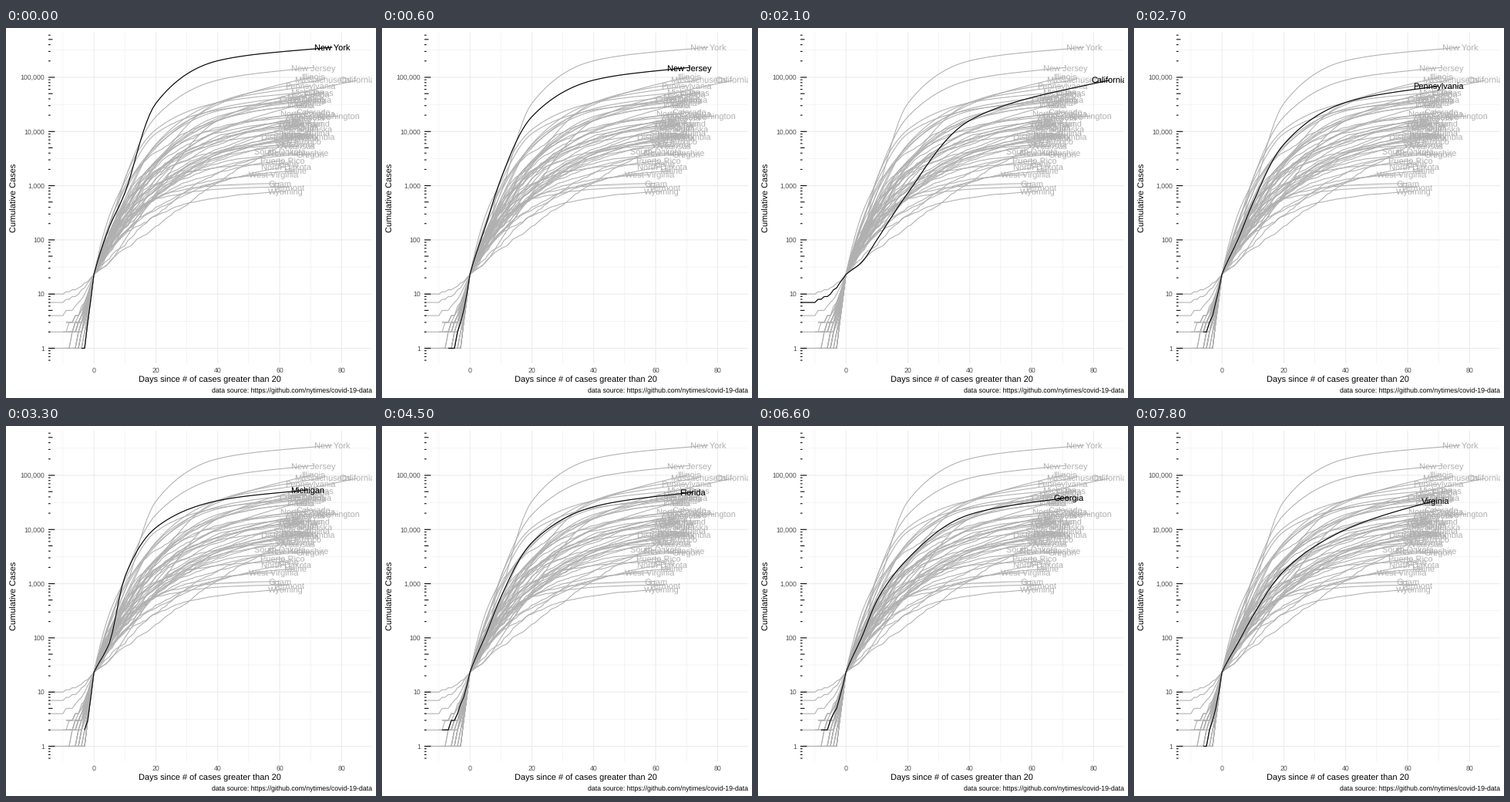
These frames come from a looping animation (480x480 px, 8 s). A matplotlib script:

```python
import matplotlib
import matplotlib.pyplot as plt
import numpy as np
from matplotlib.animation import FuncAnimation
from matplotlib.patches import Rectangle

matplotlib.rcParams.update({
    "font.family": "Liberation Sans", "text.hinting": "no_hinting", "path.snap": False,
})

SIZE, DPI = 480, 72
LEFT, RIGHT, TOP, BOTTOM = 54.8, 474.5, 5.5, 435.0
DAY_MIN, DAY_MAX = -14.75, 89.75
LOG_MIN, LOG_MAX = -0.2777, 5.8318
MUTED, GRID, LINE = "#B0B0B0", "#EBEBEB", 1.07
START = np.log10(23)
KEY_DAYS = [0, 5, 10, 20, 40]
rng = np.random.default_rng(20)


def px(day):
    return LEFT + (np.asarray(day) - DAY_MIN) / (DAY_MAX - DAY_MIN) * (RIGHT - LEFT)


def py(log):
    return BOTTOM - (np.asarray(log) - LOG_MIN) / (LOG_MAX - LOG_MIN) * (BOTTOM - TOP)


def smooth(x, y, t):
    """Monotone cubic through the points (x, y), evaluated at t."""
    gap = np.diff(x)
    slope = np.diff(y) / gap
    inner = 2 * slope[:-1] * slope[1:] / (slope[:-1] + slope[1:])
    m = np.r_[slope[0], inner, slope[-1]]
    i = np.clip(np.searchsorted(x, t, side="right") - 1, 0, len(gap) - 1)
    u, h = (t - x[i]) / gap[i], gap[i]
    return (y[i] * (1 + 2 * u) * (1 - u) ** 2 + h * m[i] * u * (1 - u) ** 2
            + y[i + 1] * u * u * (3 - 2 * u) + h * m[i + 1] * u * u * (u - 1))


def with_lead(first, base, logs):
    """Put whole-number counts, rising from base, before day 0."""
    days = np.arange(first, 0)
    rise = ((days - first) / -first) ** (1 - first / 8)
    counts = np.round(10 ** (np.log10(base) + (START - np.log10(base)) * rise))
    return np.arange(first, len(logs)), np.r_[np.log10(counts), logs]


def keyed(first, base, counts, end):
    """Curve through counts at the key days and the last day, in stretched time."""
    def warp(day):
        return np.log(np.asarray(day) + 10)
    logs = np.r_[START, np.log10(counts)]
    return with_lead(first, base, smooth(warp(KEY_DAYS + [end]), logs,
                                         warp(np.arange(end + 1))))


def trend(end, cases, decay):
    """Growth that slows exponentially, with uneven daily steps."""
    first = -int(min(4 + rng.exponential(4), 16))
    base = rng.choice([1, 2, 7, 10, 13] if first < -11 else [1, 1, 1, 2, 3])
    steps = np.exp(-decay * np.arange(end)) * rng.uniform(0.45, 1.55, end)
    growth = np.r_[0, np.cumsum(steps)] / steps.sum()
    return with_lead(first, base, START + (np.log10(cases) - START) * growth)


# Highlighted in this order: first day and count, counts at the key days and the end.
curves = {
    "New York": keyed(-4, 1, [173, 732, 33e3, 202e3, 358e3], 77),
    "New Jersey": keyed(-7, 1, [176, 1336, 18.7e3, 88.8e3, 152e3], 71),
    "Illinois": keyed(-16, 2, [104, 753, 5e3, 31.5e3, 103e3], 71),
    "Massachusetts": keyed(-16, 1, [123, 256, 2400, 34e3, 90e3], 74),
    "California": keyed(-16, 7, [38, 100, 732, 16e3, 88e3], 85),
    "Pennsylvania": keyed(-6, 2, [96, 479, 5800, 34.5e3, 69e3], 70),
    "Michigan": keyed(-3, 2, [80, 1328, 10.8e3, 34e3, 53.5e3], 69),
    "Texas": keyed(-16, 4, [59, 190, 2600, 17.5e3, 53e3], 74),
    "Florida": keyed(-9, 2, [109, 564, 5700, 26.3e3, 48.7e3], 72),
    "Maryland": keyed(-9, 3, [107, 349, 2750, 15.7e3, 43.7e3], 68),
    "Connecticut": keyed(-7, 1, [194, 875, 5300, 24e3, 39e3], 67),
    "Georgia": keyed(-8, 2, [99, 485, 2900, 18.9e3, 39e3], 72),
    "Louisiana": keyed(-4, 1, [280, 1172, 9150, 25e3, 36.5e3], 69),
    "Virginia": keyed(-6, 1, [77, 254, 1706, 10e3, 34e3], 69),
}
order = list(curves)

# The rest by how fast their growth fades: name, last day, final count.
paces = {
    0.008: [("Nebraska", 71, 11100)],
    0.036: [("Minnesota", 68, 18200), ("Rhode Island", 68, 13700), ("Iowa", 67, 16000),
            ("Kansas", 65, 8800), ("Delaware", 66, 8400), ("North Dakota", 62, 2230),
            ("District of Columbia", 66, 7800), ("New Mexico", 66, 6470),
            ("South Dakota", 60, 4250)],
    0.05: [("Indiana", 67, 30000), ("Ohio", 68, 30200), ("Colorado", 71, 22800),
           ("Washington", 79, 19100), ("North Carolina", 69, 21000),
           ("Tennessee", 70, 19000), ("Wisconsin", 68, 14000), ("Arizona", 66, 15300),
           ("Alabama", 67, 13300), ("Mississippi", 66, 12200), ("Missouri", 66, 11500),
           ("South Carolina", 67, 9380), ("Kentucky", 67, 8400), ("Utah", 68, 8060),
           ("Nevada", 68, 7300), ("Arkansas", 66, 5400), ("New Hampshire", 66, 3940),
           ("Oregon", 70, 3820), ("Puerto Rico", 61, 2910), ("Maine", 65, 1880)],
    0.065: [("Oklahoma", 65, 5680), ("West Virginia", 58, 1590), ("Wyoming", 62, 780)],
    0.095: [("Idaho", 63, 2530), ("Guam", 60, 1100), ("Vermont", 63, 944)],
}
for decay, places in paces.items():
    for name, end, cases in places:
        curves[name] = trend(end, cases, decay * rng.uniform(0.85, 1.15))

fig = plt.figure(figsize=(SIZE / DPI, SIZE / DPI), dpi=DPI, facecolor="white")
ax = fig.add_axes([0, 0, 1, 1])
ax.set(xlim=(0, SIZE), ylim=(SIZE, 0))
ax.axis("off")
panel = Rectangle((LEFT, TOP), RIGHT - LEFT, BOTTOM - TOP, transform=ax.transData)


def stroke(x, y, color, width=LINE, z=1):
    line, = ax.plot(x, y, color=color, lw=width, zorder=z, solid_capstyle="butt",
                    solid_joinstyle="round")
    line.set_clip_path(panel)
    return line


def write(x, y, text, size, color="black", ha="center", z=6, **extra):
    return ax.text(x, y, text, fontsize=size, color=color, ha=ha, va="baseline",
                   zorder=z, **extra)


def draw_place(name, color, z):
    days, logs = curves[name]
    line = stroke(px(days), py(logs), color, z=z)
    text = write(px(days[-1]), py(logs[-1]) + 4.5, name, 11, color, z=z + 1, clip_on=True)
    text.set_clip_path(panel)
    return line, text


# Grid, axis labels and log ticks
for day in range(-10, 90, 10):
    stroke([px(day)] * 2, [TOP, BOTTOM], GRID, LINE if day % 20 == 0 else LINE / 2)
for half in range(12):
    y = py(half / 2)
    stroke([LEFT, RIGHT], [y, y], GRID, LINE / 2 if half % 2 else LINE)
    if half % 2 == 0:
        write(49.9, y + 3.2, f"{10 ** (half // 2):,}", 8.8, "#4D4D4D", "right")
for day in range(0, 81, 20):
    write(px(day), 446.5, str(day), 8.8, "#4D4D4D")
for power in range(-1, 6):
    for digit in range(1, 10):
        y = py(power + np.log10(digit))
        if TOP < y < BOTTOM:
            length = {1: 3, 5: 2}.get(digit, 1) * 2.835
            stroke([LEFT, LEFT + length], [y, y], "black", z=6)

write((LEFT + RIGHT) / 2, 459.6, "Days since # of cases greater than 20", 11)
write(RIGHT, 472.8, "data source: https://github.com/nytimes/covid-19-data", 8.8, ha="right")
write(14, (TOP + BOTTOM) / 2, "Cumulative Cases", 11, rotation=90, rotation_mode="anchor")

for name in curves:
    draw_place(name, MUTED, 2)
highlights = [draw_place(name, "black", 4) for name in order]


def update(frame):
    # Each place holds for two 300 ms steps; the loop opens halfway through the first.
    active = (frame // 3 + 1) // 2
    for i, artists in enumerate(highlights):
        for artist in artists:
            artist.set_visible(i == active)
    return [artist for pair in highlights for artist in pair]


anim = FuncAnimation(fig, update, frames=80, interval=100, repeat=True, repeat_delay=0,
                     blit=False)
plt.show()
```
